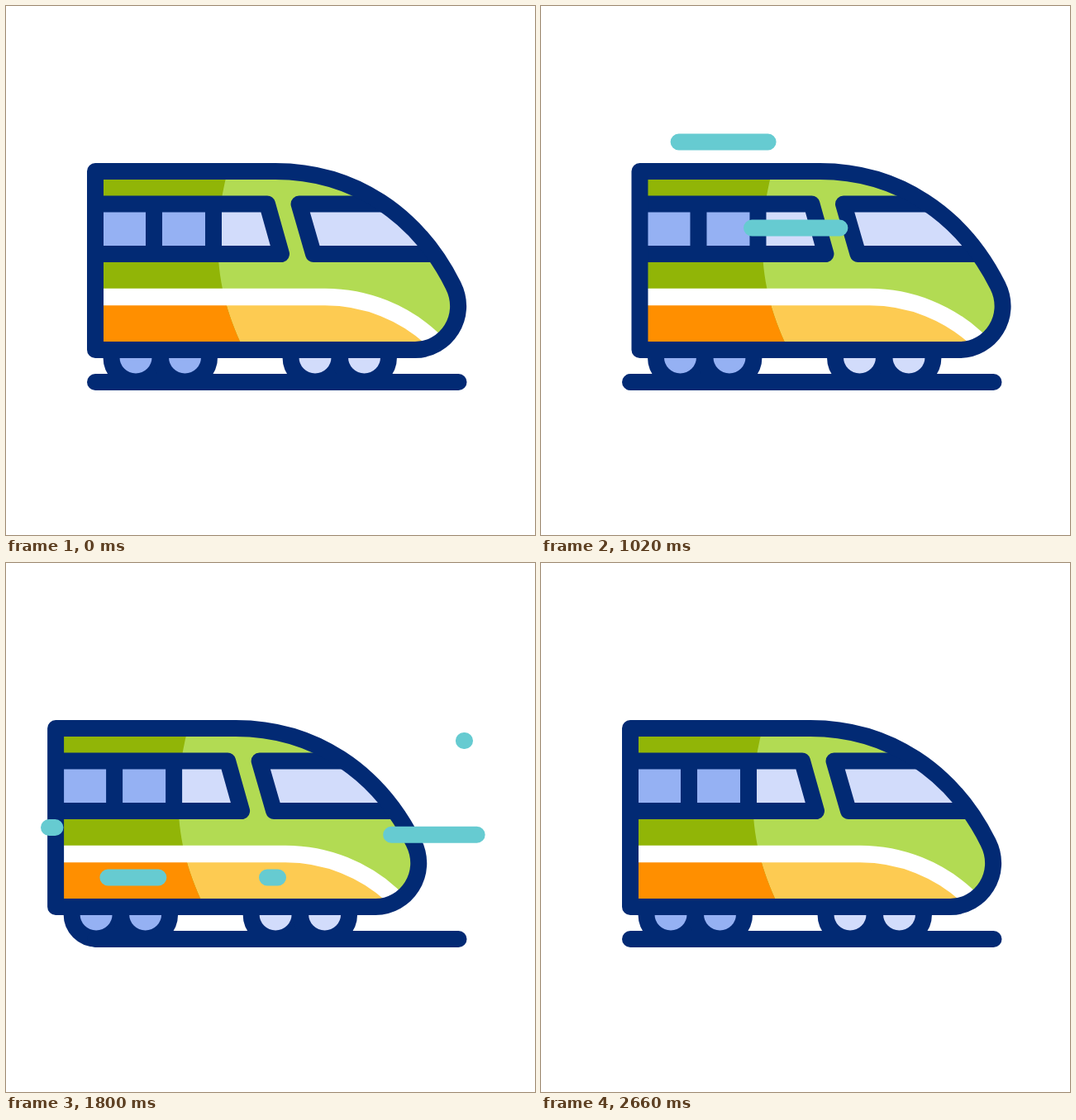
These frames come from a looping animation (640 px wide and 640 px high, 2.8 s). An HTML page:

```html
<!DOCTYPE html>
<html lang="en">
<head>
<meta charset="utf-8">
<title>Train</title>
<style>
html, body { margin: 0; height: 100%; overflow: hidden; background: #fff; }
svg { display: block; width: 100vw; height: 100vh; }
.line { fill: none; stroke: #022a74; stroke-width: 20; stroke-linecap: round; stroke-linejoin: round; }
.blue { fill: #95b1f3; }
.pale { fill: #d2dcfb; }
#streaks { fill: none; stroke: #66cbd1; stroke-width: 20; stroke-linecap: round; }
</style>
</head>
<body>
<svg viewBox="0 0 640 640">
  <defs>
    <path id="body" d="M108 200H326C420 200 498 252 541 338C560 376 532 416 495 416H108Z"/>
    <clipPath id="inside"><use href="#body"/></clipPath>
    <clipPath id="rear"><path d="M108 200H268C250 270 250 340 288 416H108Z"/></clipPath>
    <clipPath id="ground"><path d="M0 0H640V465H0Z"/></clipPath>
    <path id="lower" d="M108 352H386C437 352 482 372 514 401L530 416H108Z"/>
  </defs>

  <g clip-path="url(#ground)">
    <g class="train">
      <g class="line">
        <circle class="blue" cx="157" cy="425" r="29.5"/>
        <circle class="blue" cx="216.5" cy="425" r="29.5"/>
        <circle class="pale" cx="374" cy="425" r="29.5"/>
        <circle class="pale" cx="433.5" cy="425" r="29.5"/>
      </g>
    </g>
  </g>
  <path class="line" d="M108 455H547.5"/>

  <g class="train">
    <g clip-path="url(#inside)">
      <use href="#body" fill="#b2db53"/>
      <use href="#lower" fill="#fdcb52"/>
      <g clip-path="url(#rear)">
        <use href="#body" fill="#91b507"/>
        <use href="#lower" fill="#ff8f00"/>
      </g>
      <path d="M108 352H386C437 352 482 372 514 401L530 416" fill="none" stroke="#fff" stroke-width="20.5"/>
      <path class="blue" d="M108 240H251V300H108Z"/>
      <path class="pale" d="M251 240H316L333 300H251Z"/>
      <path class="line" d="M108 239.5H316L333 300H108M179 240V300M251 240V300"/>
      <path class="pale" d="M560 239.5H354.5L372 300H560"/>
      <path class="line" d="M560 239.5H354.5L372 300H560"/>
    </g>
    <use href="#body" class="line"/>
  </g>
  <g id="streaks"><path/></g>
</svg>
<script>
const LOOP = 2800;
const FAST = { delay: 215, length: 460 };
const SLOW = { delay: 100, length: 653 };
const HEAD_LENGTH = 520;

// Each streak runs from x = from to x = to, its tail following its head.
const streaks = [
  { y: 164.5, from: 295, to: 98, starts: [710, 1960], tail: FAST },
  { y: 328.8, from: 576, to: 364, starts: [203, 1535], tail: FAST },
  { y: 268.5, from: 464, to: 250, starts: [552], tail: { delay: 245, length: 460 } },
  { y: 380.5, from: 329, to: 123, starts: [1295, 1717], tail: FAST },
  { y: 320, from: 167, to: 52, starts: [1155], tail: SLOW },
  { y: 215, from: 555, to: 441, starts: [1768], tail: SLOW }
];
const sway = [[200, 0], [760, 25.5], [1680, -50], [2600, 0]];

const ease = u => (1 - Math.cos(Math.PI * Math.min(1, Math.max(0, u)))) / 2;
const mix = (a, b, p) => a + (b - a) * p;

function swayAt(t) {
  let x = 0;
  for (let i = 1; i < sway.length; i++) {
    const [t0, x0] = sway[i - 1], [t1, x1] = sway[i];
    if (t >= t0) x = mix(x0, x1, ease((t - t0) / (t1 - t0)));
  }
  return x;
}

function bounceAt(t) {
  return t > 200 && t < 2600 ? 2.5 * (1 - Math.cos((t - 200) / 400 * Math.PI)) : 0;
}

function streakPath({ y, from, to, starts, tail }, t) {
  return starts.map(start => {
    const age = t - start;
    if (age <= 0 || age >= tail.delay + tail.length) return "";
    const head = mix(from, to, ease(age / HEAD_LENGTH));
    const end = mix(from, to, ease((age - tail.delay) / tail.length));
    return `M${head} ${y}H${end + 0.01}`;
  }).join("");
}

const trainParts = document.querySelectorAll(".train");
const streakLine = document.querySelector("#streaks path");

function draw(now) {
  const t = now % LOOP;
  const move = `translate(${swayAt(t)} ${bounceAt(t)})`;
  trainParts.forEach(part => part.setAttribute("transform", move));
  streakLine.setAttribute("d", streaks.map(s => streakPath(s, t)).join(""));
}

const begin = performance.now();
function tick() {
  draw(performance.now() - begin);
  requestAnimationFrame(tick);
}
tick();
</script>
</body>
</html>
```
